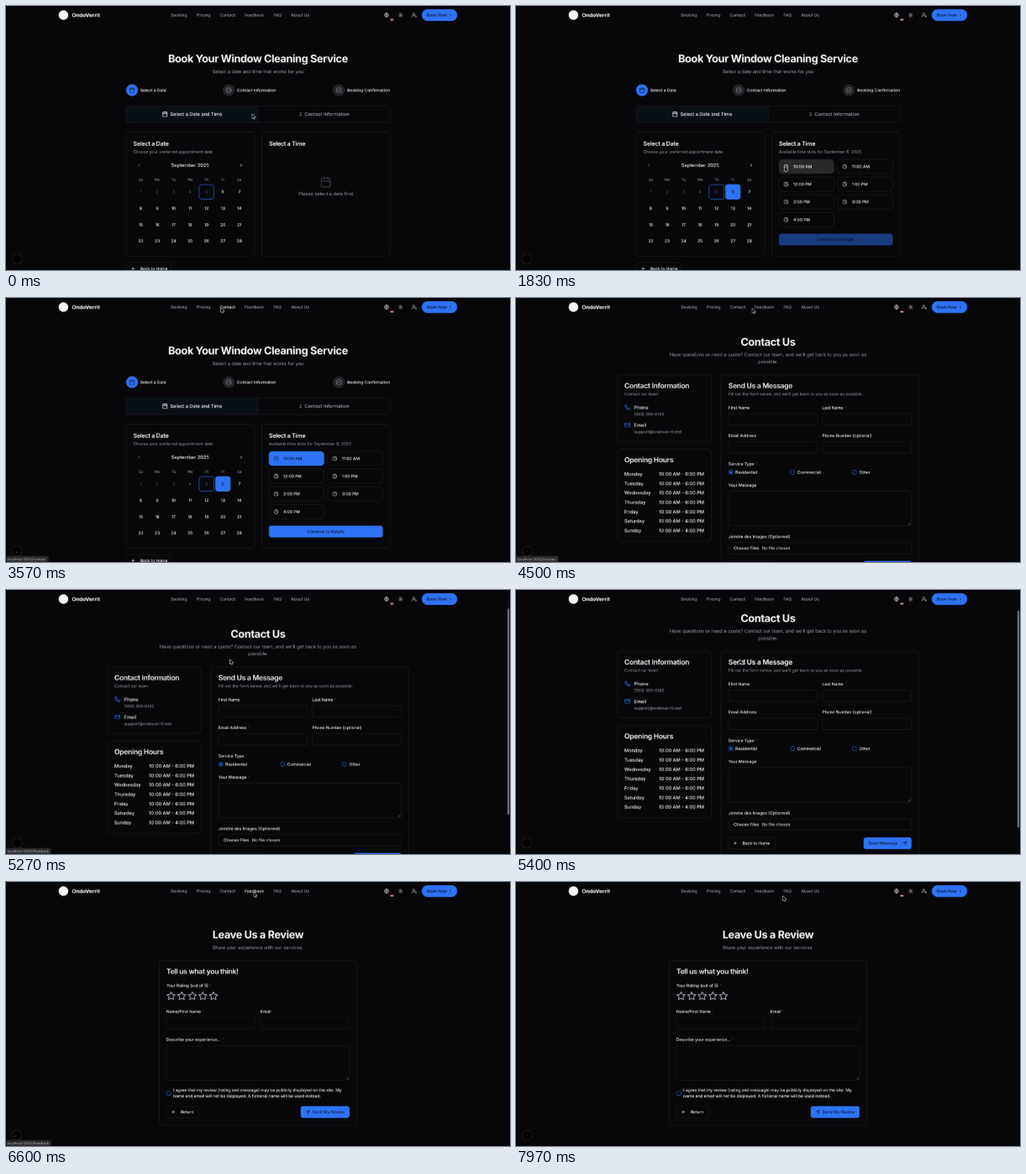
Animation, 600 px wide and 315 px high, one loop 8000 ms. Source, as an HTML page with a canvas:

```html
<!DOCTYPE html>
<html lang="en">
<head>
<meta charset="utf-8">
<title>Booking walkthrough</title>
<style>
html, body { margin: 0; width: 100%; height: 100%; overflow: hidden; background: #070709; }
canvas { display: block; width: 600px; height: 315px; }
</style>
</head>
<body>
<canvas id="stage"></canvas>
<script>
// The scene is drawn enlarged and then reduced, which keeps tiny text smooth and unsnapped.
const DETAIL = 3;
const dpr = window.devicePixelRatio || 1;
const canvas = document.getElementById('stage');
const scene = document.createElement('canvas');
canvas.width = 600 * dpr;
canvas.height = 315 * dpr;
scene.width = canvas.width * DETAIL;
scene.height = canvas.height * DETAIL;
const output = canvas.getContext('2d');
const ctx = scene.getContext('2d');

const LOOP = 8000;
const UNIT = 600 / 1710;
const BG = '#070709', HEADER = '#08080a', LINE = '#222226', WHITE = '#fafafa', MUTED = '#a1a1aa',
      DIM = '#4a4a51', BLUE = '#2e73f5', NAVY = '#0a1730', HOVER = '#29292c';

const RING = 'M22 12a10 10 0 1 1-20 0a10 10 0 1 1 20 0';
const ICONS = {
  calendar: 'M8 2v4M16 2v4M3 10h18M5 4h14a2 2 0 0 1 2 2v14a2 2 0 0 1-2 2H5a2 2 0 0 1-2-2V6a2 2 0 0 1 2-2z',
  clock: RING + 'M12 6v6l4 2',
  check: RING + 'M9 12l2 2 4-4',
  globe: RING + 'M2 12h20M12 2a15 15 0 0 1 0 20a15 15 0 0 1 0-20',
  sun: 'M16 12a4 4 0 1 1-8 0a4 4 0 1 1 8 0M12 2v2M12 20v2M5 5l1.4 1.4M17.6 17.6l1.4 1.4M2 12h2M20 12h2M6.4 17.6l-1.4 1.4M19 5l-1.4 1.4',
  user: 'M2 21a8 8 0 0 1 11-7.4M15 8a5 5 0 1 1-10 0a5 5 0 1 1 10 0M21 18a3 3 0 1 1-6 0a3 3 0 1 1 6 0',
  back: 'M19 12H5M12 19l-7-7 7-7',
  next: 'M9 18l6-6-6-6',
  prev: 'M15 18l-6-6 6-6',
  phone: 'M22 17v3a2 2 0 0 1-2 2A18 18 0 0 1 2 4a2 2 0 0 1 2-2h3a2 2 0 0 1 2 1.7l.8 3.4-2 2.4a16 16 0 0 0 6.6 6.6l2.4-2 3.4.8A2 2 0 0 1 22 17z',
  mail: 'M4 4h16a2 2 0 0 1 2 2v12a2 2 0 0 1-2 2H4a2 2 0 0 1-2-2V6a2 2 0 0 1 2-2zM22 7l-10 6L2 7',
  send: 'M22 2l-7 20-4-9-9-4zM22 2L11 13',
  star: 'M12 2l3.1 6.3 6.9 1-5 4.9 1.2 6.8-6.2-3.2-6.2 3.2L7 14.2 2 9.3l6.9-1z',
};
for (const name in ICONS) ICONS[name] = new Path2D(ICONS[name]);

const NAV = [['Booking', 196.3], ['Pricing', 227], ['Contact', 254.5], ['Feedback', 284], ['FAQ', 318.5], ['About Us', 339.3]];

// Pointer stops: time, x, y
const POINTER = [
  [0, 293, 129], [330, 293, 129], [430, 272, 191], [600, 272, 191], [770, 268, 209], [970, 268, 209],
  [1100, 259, 219], [1450, 259, 219], [1730, 320, 192], [2650, 320, 192], [3350, 256, 12], [4300, 256, 12],
  [4600, 290, 13], [5100, 266.5, 83], [5950, 266.5, 83], [6250, 295, 12.5], [6800, 295, 12.5],
  [7200, 373, 22], [7630, 373, 22], [7900, 317.7, 17], [LOOP, 317.7, 17],
];

const smooth = p => p * p * (3 - 2 * p);
const progress = (t, from, to) => smooth(Math.min(1, Math.max(0, (t - from) / (to - from))));
const within = (t, from, to) => t >= from && t < to;
let pointer = { x: 0, y: 0 };

function pointerAt(t) {
  const i = POINTER.findIndex(stop => stop[0] > t);
  const [t0, x0, y0] = POINTER[i - 1], [t1, x1, y1] = POINTER[i];
  const p = progress(t, t0, t1);
  return { x: x0 + (x1 - x0) * p, y: y0 + (y1 - y0) * p };
}

const hovered = (x, y, w, h) =>
  pointer.x >= x && pointer.x <= x + w && pointer.y >= y && pointer.y <= y + h;

// size is in CSS pixels, y is the middle of the capitals; returns the end of the line
function text(str, x, y, { size = 14, weight = 400, color = WHITE, align = 'left', tight = false } = {}) {
  ctx.font = `${weight} ${size * UNIT}px Inter, sans-serif`;
  ctx.letterSpacing = tight ? `${-0.025 * size * UNIT}px` : '0px';
  ctx.textAlign = align;
  ctx.fillStyle = color;
  ctx.fillText(str, x, y + 0.364 * size * UNIT);
  return x + ctx.measureText(str).width;
}
const muted = (str, x, y, size = 14, align) => text(str, x, y, { size, align, color: MUTED });
const label = (str, x, y, color = WHITE, align) => text(str, x, y, { weight: 500, color, align });
const body = (str, x, y, align, color) => text(str, x, y, { size: 16, weight: 500, align, color });
const heading = (str, x, y, size = 24) => text(str, x, y, { size, weight: 600, tight: true });

function required(str, x, y) {
  text('*', label(str, x, y) + 1.4, y, { color: '#5c2226' });
}

function pageTitle(title, y, ...lines) {
  text(title, 300, y, { size: 36, weight: 700, align: 'center', tight: true });
  lines.forEach((line, i) => muted(line, 300, y + 15.4 + i * 8.4, 16, 'center'));
}

function box(x, y, w, h, r, fill, stroke, lineWidth = 0.5) {
  ctx.beginPath();
  ctx.roundRect(x, y, w, h, r);
  if (fill) { ctx.fillStyle = fill; ctx.fill(); }
  if (stroke) { ctx.strokeStyle = stroke; ctx.lineWidth = lineWidth; ctx.stroke(); }
}
const card = (x, y, w, h) => box(x, y, w, h, 4.2, BG, LINE);

function disc(x, y, r, fill, stroke, lineWidth) {
  box(x - r, y - r, 2 * r, 2 * r, r, fill, stroke, lineWidth);
}

function icon(name, x, y, size, color) {
  ctx.save();
  ctx.translate(x - size / 2, y - size / 2);
  ctx.scale(size / 24, size / 24);
  ctx.lineWidth = 2;
  ctx.lineCap = ctx.lineJoin = 'round';
  ctx.strokeStyle = color;
  ctx.stroke(ICONS[name]);
  ctx.restore();
}

const input = (x, y, w) => box(x, y, w, 13.6, 2.6, BG, LINE);

function textarea(x, y, w, h) {
  box(x, y, w, h, 2.6, BG, LINE);
  ctx.beginPath();
  for (const d of [1.2, 2.6]) {
    ctx.moveTo(x + w - 1 - d, y + h - 1);
    ctx.lineTo(x + w - 1, y + h - 1 - d);
  }
  ctx.strokeStyle = '#77777d';
  ctx.lineWidth = 0.4;
  ctx.stroke();
}

function radio(x, y, checked) {
  disc(x, y, 2.6, null, BLUE, 0.5);
  if (checked) disc(x, y, 1.3, BLUE);
}

function backButton(str, x, y, w) {
  box(x, y, w, 13.8, 2.8, BG, LINE);
  icon('back', x + 8.6, y + 6.9, 5.6, WHITE);
  label(str, x + 16.8, y + 6.9);
}

function header() {
  ctx.globalAlpha = 0.94;
  box(0, 0, 600, 22.5, 0, HEADER);
  ctx.globalAlpha = 1;
  disc(68.4, 11, 5.7, '#f4f4f5');
  text('OndoVerrit', 78.4, 11, { size: 18, weight: 700 });
  for (const [name, x] of NAV)
    label(name, x, 11, hovered(x - 1, 7, name.length * 2.8, 8) ? WHITE : MUTED);
  icon('globe', 453, 11, 6.2, '#d4d4d8');
  box(457.6, 15.3, 3.8, 2, 0.3, '#d8d8dc');
  box(457.6, 15.3, 3.8, 1, 0.3, '#b8323f');
  icon('sun', 469.8, 11, 6.2, '#d4d4d8');
  icon('user', 486, 11, 6.2, '#d4d4d8');
  box(495, 4, 42.2, 14, 7, BLUE);
  label('Book Now', 501, 11, NAVY);
  icon('next', 529, 11, 5.6, NAVY);
}

function calendar(picked) {
  card(143, 150.5, 153, 147.8);
  heading('Select a Date', 151.5, 164, 20);
  muted('Choose your preferred appointment date', 151.5, 174);
  icon('prev', 158.3, 190, 5.6, '#77777e');
  body('September 2025', 219.3, 190, 'center');
  icon('next', 280, 190, 5.6, WHITE);
  'Su Mo Tu We Th Fr Sa'.split(' ').forEach((day, i) =>
    muted(day, 160.5 + i * 19.55, 207, 12, 'center'));
  for (let day = 1; day <= 28; day++) {
    const x = 160.5 + (day - 1) % 7 * 19.55, y = 221.7 + Math.floor((day - 1) / 7) * 19.55;
    const chosen = picked && day === 6;
    if (day === 5) box(x - 8.8, y - 8.8, 17.6, 17.6, 3.2, '#08090d', BLUE, 0.5);
    else if (chosen) box(x - 9.1, y - 9.1, 18.2, 18.2, 3.2, BLUE);
    else if (day > 5 && hovered(x - 9, y - 9, 18, 18)) box(x - 9, y - 9, 18, 18, 3.2, HOVER);
    label(String(day), x, y, chosen ? NAVY : day < 6 ? DIM : WHITE, 'center');
  }
}

function timeSlots(picked, slotPicked) {
  card(304.3, 150.5, 152.7, 147.8);
  heading('Select a Time', 313, 164, 20);
  if (!picked) {
    icon('calendar', 380.7, 210, 14, '#38383d');
    muted('Please select a date first', 380.7, 223.8, 16, 'center');
    return;
  }
  muted('Available time slots for September 6, 2025', 313, 174);
  for (let i = 0; i < 7; i++) {
    const x = i % 2 ? 382.8 : 313, y = 183 + Math.floor(i / 2) * 21.1;
    const chosen = slotPicked && i === 0;
    box(x, y, 65.5, 17, 4.2, chosen ? BLUE : hovered(x, y, 65.5, 17) ? HOVER : BG, chosen ? BLUE : LINE);
    icon('clock', x + 8.6, y + 8.5, 5.8, chosen ? NAVY : WHITE);
    label(`${(i + 9) % 12 + 1}:00 ${i < 2 ? 'AM' : 'PM'}`, x + 17, y + 8.5, chosen ? NAVY : WHITE);
  }
  box(313, 271.5, 135.5, 14, 2.8, slotPicked ? BLUE : '#193c7d');
  label('Continue to Details', 380.7, 278.5, slotPicked ? NAVY : '#080f1e', 'center');
}

function bookingPage(t) {
  const picked = t >= 1200;
  pageTitle('Book Your Window Cleaning Service', 62.8, 'Select a date and time that works for you');
  const steps = [['Select a Date', 150, 'calendar'], ['Contact Information', 265.2, 'clock'], ['Booking Confirmation', 396.3, 'check']];
  steps.forEach(([name, x, symbol], i) => {
    disc(x, 100.5, 7, i ? '#242427' : BLUE);
    icon(symbol, x, 100.5, 7, i ? MUTED : NAVY);
    label(name, x + 9.8, 100.5);
  });
  box(143, 119.2, 314, 19.6, 2.8, BG, LINE);
  box(143.3, 119.5, 157, 19, [2.6, 0, 0, 2.6], '#080f15');
  box(300, 119.5, 0.4, 19, 0, LINE);
  icon('calendar', 189.2, 129, 7, WHITE);
  body('Select a Date and Time', 195.5, 129);
  muted('2', 349, 129, 16);
  body('Contact Information', 355.3, 129, 'left', MUTED);
  calendar(picked);
  timeSlots(picked, t >= 2150);
  backButton('Back to Home', 143, 306.2, 53);
}

function contactPage() {
  pageTitle('Contact Us', 52.3,
    "Have questions or need a quote? Contact our team, and we'll get back to you as soon as", 'possible.');

  card(120.7, 92, 111.8, 79);
  heading('Contact Information', 129, 104.6);
  muted('Contact our team', 129, 114.4);
  const details = [['phone', 'Phone', '(555) 555-0142'], ['mail', 'Email', 'support@ondoverrit.test']];
  details.forEach(([symbol, name, value], i) => {
    const y = 130.5 + i * 21;
    icon(symbol, 132.7, y, 7, BLUE);
    body(name, 140.5, y);
    muted(value, 140.5, y + 8);
  });

  card(120.7, 180.3, 111.8, 109.7);
  heading('Opening Hours', 129, 193);
  'Monday Tuesday Wednesday Thursday Friday Saturday Sunday'.split(' ').forEach((day, i) => {
    const y = 210 + i * 11.22;
    body(day, 129, y);
    body(`10:00 AM - ${i < 5 ? 6 : 4}:00 PM`, 224, y, 'right');
  });

  card(244, 92, 235.5, 243.6);
  heading('Send Us a Message', 252.8, 104.6);
  muted("Fill out the form below, and we'll get back to you as soon as possible.", 252.8, 114.4);
  required('First Name', 252.8, 130.8);
  required('Last Name', 364.6, 130.8);
  required('Email Address', 252.8, 164.3);
  label('Phone Number (optional)', 364.6, 164.3);
  for (const y of [138, 171.5]) {
    input(252.8, y, 106);
    input(364.6, y, 106);
  }
  required('Service Type', 252.8, 198);
  ['Residential', 'Commercial', 'Other'].forEach((name, i) => {
    radio(255.6 + i * 73.6, 207.8, i === 0);
    label(name, 261.2 + i * 73.6, 207.8);
  });
  required('Your Message', 252.8, 223.2);
  textarea(252.8, 230.3, 217.8, 41.2);
  label('Joindre des Images (Optionnel)', 252.8, 284.4);
  input(252.8, 291.5, 217.8);
  label('Choose Files', 259.2, 298.3);
  text('No file chosen', 293, 298.3);
  backButton('Back to Home', 252.8, 313.6, 55.5);
  box(413.8, 313.6, 57, 14, 2.8, BLUE);
  label('Send Message', 419.5, 320.5, NAVY);
  icon('send', 462.7, 320.5, 5.6, NAVY);
}

function feedbackPage() {
  pageTitle('Leave Us a Review', 62.8, 'Share your experience with our services.');
  card(182.4, 94, 235.4, 196);
  heading('Tell us what you think!', 191, 106.6);
  required('Your Rating (out of 5)', 191, 123.6);
  for (let i = 0; i < 5; i++) icon('star', 196.5 + i * 12.62, 136, 11.6, '#a9a9b0');
  required('Name/First Name', 191, 154.4);
  required('Email', 303, 154.4);
  input(191, 161.5, 106);
  input(303, 161.5, 106);
  required('Describe your experience...', 191, 188);
  textarea(191, 195.2, 218, 41.2);
  radio(193.8, 252, false);
  label('I agree that my review (rating and message) may be publicly displayed on the site. My', 199.2, 248.2);
  label('name and email will not be displayed. A fictional name will be used instead.', 199.2, 255.2);
  backButton('Return', 191, 267.4, 38.5);
  box(350.8, 267.3, 58.2, 14, 2.8, BLUE);
  icon('send', 359.3, 274.3, 5.6, NAVY);
  label('Send My Review', 364.6, 274.3, NAVY);
}

function scrollbar(t, scroll) {
  ctx.globalAlpha = progress(t, 5130, 5220) * (1 - progress(t, 6050, 6250));
  box(597, 9.5 + scroll * 0.82, 2.2, 258.5, 1.1, '#77777b');
  ctx.globalAlpha = 1;
}

function badge(t) {
  disc(13, 301.8, 5.8, '#000', '#2c2c2f', 0.6);
  if (within(t, 3480, 4000) || within(t, 6300, 6750))
    disc(10.8 + Math.floor(t / 180) % 3 * 2, 303, 0.5, '#d4d4d8');
}

function statusBar(t) {
  const path = within(t, 3460, 4550) ? 'contact'
    : within(t, 4550, 5400) || within(t, 6250, 6950) ? 'feedback' : null;
  if (!path) return;
  box(0, 307.6, path === 'contact' ? 50.5 : 53.7, 7.4, [0, 1.5, 0, 0], '#29292c');
  text('localhost:3000/' + path, 1.6, 311.6, { size: 12, color: '#b4b4b8' });
}

function drawPointer() {
  ctx.save();
  ctx.translate(pointer.x, pointer.y);
  ctx.beginPath();
  for (const [x, y] of [[0, 0], [0, 5], [1.2, 4], [2, 5.8], [2.9, 5.4], [2.1, 3.6], [3.7, 3.6]]) ctx.lineTo(x, y);
  ctx.closePath();
  ctx.lineJoin = 'round';
  ctx.lineWidth = 1;
  ctx.strokeStyle = '#e0e0e2';
  ctx.stroke();
  ctx.fillStyle = '#000';
  ctx.fill();
  ctx.restore();
}

function draw(t) {
  ctx.setTransform(dpr * DETAIL, 0, 0, dpr * DETAIL, 0, 0);
  ctx.textRendering = 'geometricPrecision';
  box(0, 0, 600, 315, 0, BG);
  pointer = pointerAt(t);

  if (t < 3950) bookingPage(t);
  else if (t < 6450) {
    const scroll = 34.5 * progress(t, 5280, 5510);
    ctx.save();
    ctx.translate(0, -scroll);
    contactPage();
    ctx.restore();
    scrollbar(t, scroll);
  } else feedbackPage();

  header();
  badge(t);
  statusBar(t);
  drawPointer();

  output.imageSmoothingQuality = 'high';
  output.drawImage(scene, 0, 0, canvas.width, canvas.height);
}

const start = performance.now();
function tick() {
  draw((performance.now() - start) % LOOP);
  requestAnimationFrame(tick);
}
tick();
</script>
</body>
</html>
```
